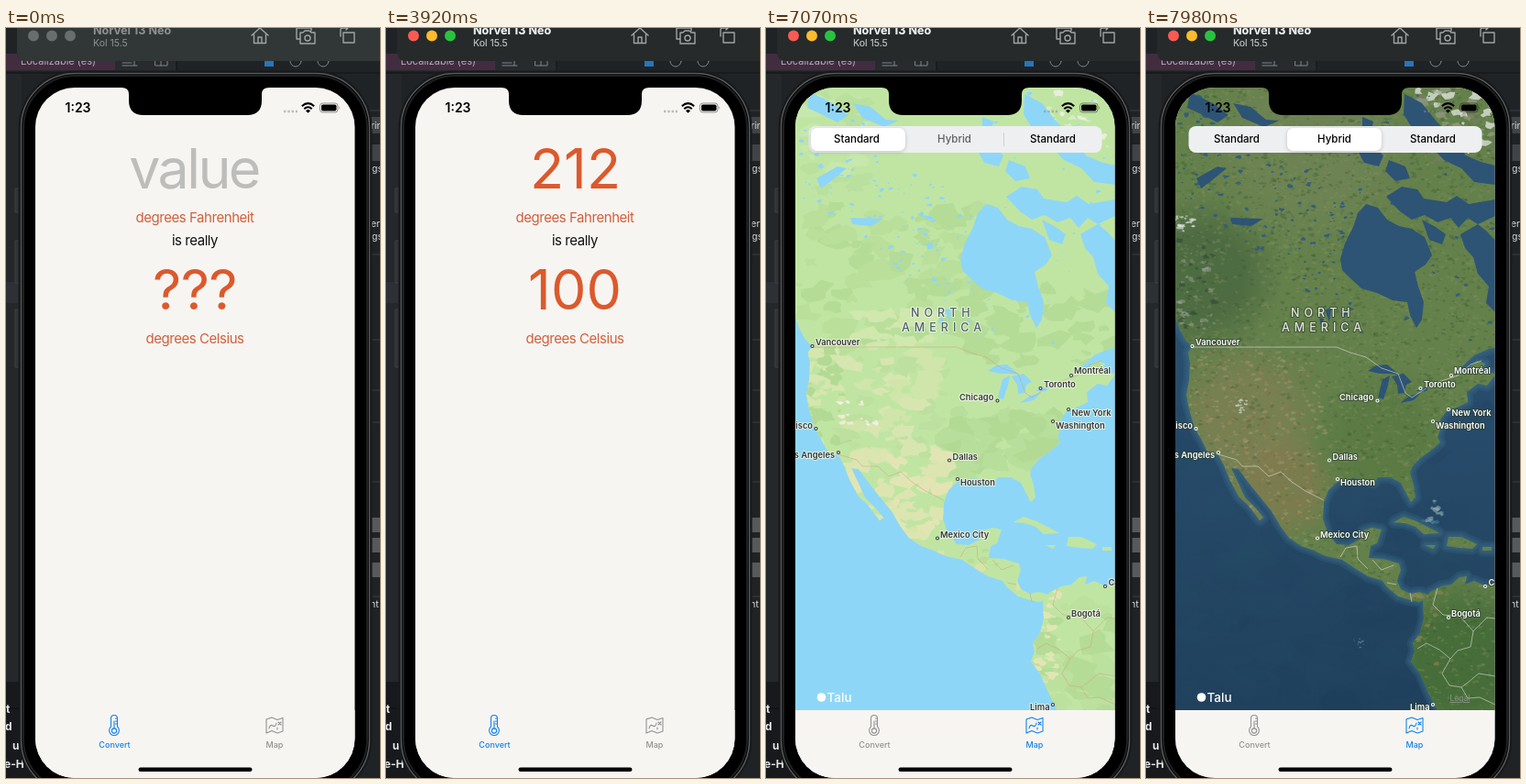
An HTML page with a canvas that plays this animation: 408x818 px, repeating every 8 s.

```html
<!DOCTYPE html>
<html lang="en">
<head>
<meta charset="utf-8">
<title>Converter demo</title>
<style>
html, body { margin: 0; width: 100%; height: 100%; overflow: hidden; background: #1d2022; }
.layer { position: absolute; left: 0; top: 0; width: 408px; height: 818px; display: block; }
.screen { clip-path: inset(65px 27.5px 0 32px round 43px); }
text { font-family: Inter, sans-serif; font-optical-sizing: none; white-space: pre; }
.mid { text-anchor: middle; }
.end { text-anchor: end; }
.big { font-size: 61px; fill: #dc592d; text-anchor: middle; }
.unit { font-size: 15px; letter-spacing: -.45px; text-anchor: middle; }
.tab { font-size: 9px; font-weight: 500; text-anchor: middle; fill: currentColor; }
.seg { font-size: 11.5px; font-weight: 500; text-anchor: middle; }
.line { fill: none; stroke: currentColor; stroke-linejoin: round; stroke-linecap: round; }
.city text { font-size: 9.3px; font-weight: 600; fill: var(--ink); stroke: var(--halo); stroke-width: 2px; paint-order: stroke; stroke-linejoin: round; }
.city circle { fill: var(--dot); stroke: var(--ink); stroke-width: 1.1px; }
.city .region { font-size: 12.5px; font-weight: 500; letter-spacing: 5px; fill: var(--region); }
.day { --ink: #363636; --halo: #f4faeecc; --dot: #fff; --region: #51616b; }
.night { --ink: #fff; --halo: #2a3a2aaa; --dot: #35463a; --region: #e2e6df; }

/* hard cuts */
.cut { animation: 8s step-end infinite; }
.idle { animation-name: idle; }
.live { animation-name: live; }
.caret { animation-name: caret; }
.empty { animation-name: empty; }
.one { animation-name: one; }
.two { animation-name: two; }
.three { animation-name: three; }
.lastCaret { animation-name: lastCaret; }
.map { animation-name: map; }
.dayText { animation-name: dayText; }
.logo { animation-name: logo; }
.legal { animation-name: legal; }
.tabA { animation-name: tabA; }
.tabB { animation-name: tabB; }
@keyframes idle { 0% { opacity: 1 } 11.37%, 100% { opacity: 0 } }
@keyframes live { 0% { opacity: 0 } 11.37%, 100% { opacity: 1 } }
@keyframes caret { 0% { opacity: 0 } 21.87% { opacity: 1 } 26.25% { opacity: 0 } 28.87% { opacity: 1 } 30.62%, 100% { opacity: 0 } }
@keyframes empty { 0% { opacity: 1 } 30.62%, 100% { opacity: 0 } }
@keyframes one { 0% { opacity: 0 } 30.62% { opacity: 1 } 37.62%, 100% { opacity: 0 } }
@keyframes two { 0% { opacity: 0 } 37.62% { opacity: 1 } 41.12%, 100% { opacity: 0 } }
@keyframes three { 0% { opacity: 0 } 41.12%, 100% { opacity: 1 } }
@keyframes lastCaret { 0% { opacity: 1 } 48.99%, 100% { opacity: 0 } }
@keyframes map { 0% { opacity: 0 } 65.62%, 100% { opacity: 1 } }
@keyframes dayText { 0% { opacity: 0 } 69.99% { opacity: 1 } 90.12%, 100% { opacity: 0 } }
@keyframes logo { 0% { color: #3d566b } 87.5%, 100% { color: #fff } }
@keyframes legal { 0% { opacity: 1 } 87.5%, 100% { opacity: 0 } }
@keyframes tabA { 0% { color: #1480ea } 65.62%, 100% { color: #929292 } }
@keyframes tabB { 0% { color: #929292 } 65.62%, 100% { color: #1480ea } }

/* fades and slides */
.sat { animation: sat 8s linear infinite; }
.nightText { animation: nightText 8s linear infinite; }
.thumb { animation: thumb 8s ease-out infinite; }
.press { animation: press 8s linear infinite; }
.divider { animation: divider 8s linear infinite; }
@keyframes sat { 0%, 89% { opacity: 0 } 91.4%, 100% { opacity: 1 } }
@keyframes nightText { 0%, 91% { opacity: 0 } 91.87% { opacity: .33 } 93.6%, 100% { opacity: 1 } }
@keyframes thumb { 0%, 88.3% { transform: none } 88.4% { transform: translateX(1px) } 91.87% { transform: translateX(104.5px) } 94%, 100% { transform: translateX(106px) } }
@keyframes press { 0%, 85.7% { opacity: 1 } 86.6%, 88.5% { opacity: .6 } 90.5%, 100% { opacity: 1 } }
@keyframes divider { 0%, 88.5% { opacity: 1 } 91%, 100% { opacity: 0 } }
</style>
</head>
<body>
<svg class="layer" viewBox="0 0 408 818">
  <rect width="408" height="818" fill="#202326"/>
  <path d="M0 28H186V47H0Z" fill="#282a2e"/>
  <path d="M0 28H119V46H0Z" fill="#422d40"/>
  <path d="M0 49H408M186 28V48" stroke="#111315"/>
  <path d="M0 50H17V715H0Z" fill="#25282b"/>
  <path d="M0 277H17V300H0Z" fill="#2d3035"/>
  <path d="M10 175H20V201H10ZM10 232H20V278H10ZM10 307H20V370H10Z" fill="#303336" stroke="#3c4043"/>
  <path d="M0 715H60V818H0Z" fill="#17191c"/>
  <path d="M0 714H30M0 742H30" stroke="#0b0c0d"/>
  <text x="16" y="40" font-size="11" fill="#b8a9b5">Localizable (es)</text>
  <g class="line" color="#7e8488"><path d="M127 35H143M127 38H137M127 41H143M140 34V41M163 33H176V41H163ZM169 33V41"/><circle cx="316" cy="36" r="6"/><circle cx="346" cy="36" r="6"/></g>
  <path d="M282 33H292V42H282Z" fill="#2476c0"/>
  <g font-size="12" font-weight="700" fill="#e4e6e7">
    <text x="0" y="747">t</text><text x="-1" y="766">d</text><text x="7" y="787">u</text><text x="-2" y="807">e-H</text>
  </g>
  <path d="M396 97H408V115H396ZM396 127H408V145H396Z" fill="#404347"/>
  <path d="M396 534H408V550H396ZM396 556H408V572H396ZM396 583H408V599H396Z" fill="#57595c"/>
  <path d="M396 90H408M396 247H408M396 340H408M396 395H408M396 430H408M396 495H408M396 620H408" stroke="#393d40"/>
  <g font-size="10.5" fill="#d6d8da">
    <text x="398" y="110">rin</text><text x="399" y="157">gs</text><text x="398" y="217">er,</text><text x="399" y="231">gs</text><text x="397" y="632">nt</text>
  </g>
  <rect x="14.5" y="47.5" width="384" height="790" rx="61" fill="#000" stroke="#191b1c" stroke-width="2"/>
  <rect x="16.5" y="49.5" width="380" height="786" rx="59" fill="#000" stroke="#5a5d5e" stroke-width="1.5"/>
  <rect x="19" y="52" width="375" height="781" rx="57" fill="#000" stroke="#1e2021" stroke-width="2"/>

  <path d="M12 0H408V36H22Q12 36 12 26Z" fill="#262a2b"/>
  <g class="cut idle">
    <path d="M12 0H408V36H22Q12 36 12 26Z" fill="#313637"/>
    <g fill="#686d6e"><circle cx="30" cy="8.5" r="6"/><circle cx="50" cy="8.5" r="6"/><circle cx="70" cy="8.5" r="6"/></g>
  </g>
  <g class="cut live"><circle cx="30" cy="8.5" r="6" fill="#fb5a52"/><circle cx="50" cy="8.5" r="6" fill="#fdbb2d"/><circle cx="70" cy="8.5" r="6" fill="#29c23f"/></g>
  <g fill="#8d9192">
    <text x="95" y="7" font-size="12.6" font-weight="700">Norvel 13 Neo</text>
    <text x="95" y="20" font-size="10.5">Kol 15.5</text>
  </g>
  <g class="cut live">
    <text x="95" y="7" font-size="12.6" font-weight="700" fill="#eceded">Norvel 13 Neo</text>
    <text x="95" y="20" font-size="10.5" fill="#b5b8b9">Kol 15.5</text>
  </g>
  <g class="line" color="#9fa4a5" stroke-width="1.4">
    <path d="M268 8L277 0L286 8M270.500 7V16.500H283.500V7M275 16V10H279V16"/>
    <path d="M320 12H317V0H333V3M321 5H324L326 3H331L333 5H337V17H321Z"/><circle cx="329" cy="11" r="3"/>
    <path d="M368 5H380V16H368ZM365 9V2Q365 0 367 0H373M371 -2L373 0L371 2"/>
  </g>
</svg>

<svg class="layer screen" viewBox="0 0 408 818">
  <rect x="32" y="65" width="349" height="753" fill="#f7f5f1"/>
  <g class="cut empty">
    <text class="big" x="205" y="175" style="fill:#bdbdbb;letter-spacing:-2.6px">value</text>
    <text class="big" x="206" y="307" letter-spacing="-.5">???</text>
  </g>
  <rect class="cut caret" x="136.500" y="114" width="2" height="76" fill="#3d8fd8"/>
  <g class="cut one">
    <text class="big" x="206" y="175">2</text><text class="big" x="206" y="307">-16.7</text>
    <rect x="225" y="114" width="2" height="76" fill="#3d8fd8"/>
  </g>
  <g class="cut two">
    <text class="big" x="206" y="175">21</text><text class="big" x="206" y="307">-6.1</text>
    <rect x="238" y="114" width="2" height="76" fill="#3d8fd8"/>
  </g>
  <g class="cut three">
    <text class="big" x="206.500" y="175">212</text><text class="big" x="206" y="307">100</text>
    <rect class="cut lastCaret" x="255" y="114" width="2" height="76" fill="#3d8fd8"/>
  </g>
  <text class="unit" x="206" y="212" fill="#d0603d">degrees Fahrenheit</text>
  <text class="unit" x="206" y="237" fill="#111">is really</text>
  <text class="unit" x="206" y="344" fill="#d0603d">degrees Celsius</text>
</svg>

<div class="layer screen cut map">
  <canvas class="layer" id="day" width="408" height="818"></canvas>
  <canvas class="layer sat" id="sat" width="408" height="818"></canvas>
  <svg class="layer" viewBox="0 0 408 818">
    <defs><g id="cities" class="city">
      <text class="region" x="158" y="315">NORTH</text><text class="region" x="148" y="331">AMERICA</text>
    </g></defs>
    <g class="cut dayText"><use href="#cities" class="day"/></g>
    <g class="nightText"><use href="#cities" class="night"/></g>
    <g class="cut logo"><circle cx="60.500" cy="730" r="4.800" fill="currentColor"/><text x="66.500" y="735" font-size="13.500" font-weight="500" fill="currentColor">Talu</text></g>
    <text class="cut legal" x="331.500" y="734" font-size="8.500" fill="#5c7480" text-decoration="underline">Legal</text>
    <text class="nightText" x="331.500" y="734" font-size="8.500" fill="#8b9689" text-decoration="underline">Legal</text>
    <rect x="46.500" y="107" width="320" height="29" rx="8" fill="#eeeff0"/>
    <path class="divider" d="M259.500 114V129" stroke="#cfd0d2"/>
    <rect class="thumb" x="48" y="109" width="103" height="25" rx="6.500" fill="#fff" style="filter:drop-shadow(0 1px 2px #0003)"/>
    <text class="seg" x="99" y="125">Standard</text><text class="seg press" x="205.500" y="125">Hybrid</text><text class="seg" x="313" y="125">Standard</text>
  </svg>
</div>

<svg class="layer screen" viewBox="0 0 408 818">
  <rect x="32" y="744" width="349" height="74" fill="#f7f5f2"/>
  <g class="cut tabA">
    <g class="line" stroke-width="1.1"><path d="M114.500 762V753A3.500 3.500 0 0 1 121.500 753V762A5.400 5.400 0 1 1 114.500 762ZM118 756V764M119.500 753H121M119.500 756H121M119.500 759H121"/><circle cx="118" cy="766.500" r="2.600"/></g>
    <text class="tab" x="118.500" y="784.500">Convert</text>
  </g>
  <g class="cut tabB">
    <path class="line" stroke-width="1.100" d="M284 754L290 752L296 754.500L302 752.500V767L296 769L290 766.500L284 769ZM287 764Q288 759 291 761T295 758M297 757L300 760M300 757L297 760M296 763V765"/>
    <text class="tab" x="293" y="784.500">Map</text>
  </g>
  <rect x="144.500" y="806.500" width="124" height="4.500" rx="2.250"/>
  <path d="M126 64H287V65Q279 65 279 72V79Q279 95 263 95H150Q134 95 134 79V72Q134 65 126 65Z"/>
  <text x="64.500" y="92" font-size="14" font-weight="600">1:23</text>
  <path d="M303 91H318" stroke="#8888" stroke-width="2.400" stroke-dasharray="2.400 1.900"/>
  <g fill="none" stroke="#000" stroke-width="2"><path d="M322.800 85.300Q329.500 79 336.200 85.300M325.300 88.200Q329.500 84.300 333.700 88.200"/></g>
  <path d="M327 90.200Q329.500 88 332 90.200L329.500 92.700Z"/>
  <rect x="342.500" y="82" width="19.500" height="10" rx="3" fill="none" stroke="#0006"/>
  <rect x="344" y="83.500" width="16.500" height="7" rx="1.800"/><path d="M363.500 85.500Q365 87 363.500 88.500Z" fill="#0008"/>
</svg>

<script>
const cities = [
  ['Vancouver', 54, 346, 50.5, 347], ['Montréal', 336, 377, 333, 379], ['Toronto', 303, 392, 299.5, 393],
  ['Chicago', 211, 406, 252.5, 406.5], ['New York', 333.5, 423, 330, 416], ['Washington', 316, 436.5, 313, 429],
  ['San Francisco', 51, 437, 54.5, 437, 'end'], ['Los Angeles', 75, 469, 79, 463, 'end'],
  ['Dallas', 203.5, 471, 200, 471.5], ['Houston', 212, 499, 209, 492], ['Mexico City', 190, 556, 187, 556.5],
  ['Bogotá', 333, 642, 330, 643], ['Caracas', 373.5, 608, 370, 609], ['Lima', 309.5, 744, 313, 738, 'end']
];
function svg(tag, attrs, text = '') {
  const el = document.createElementNS('http://www.w3.org/2000/svg', tag);
  for (const k in attrs) el.setAttribute(k, attrs[k]);
  el.textContent = text;
  document.getElementById('cities').append(el);
}
for (const [name, x, y, cx, cy, side = ''] of cities) {
  svg('circle', { cx, cy, r: 1.5 });
  svg('text', { x, y, class: side }, name);
}

const west = 'M32 60H390V347L374 350 358 357 345 369 336 378 350 372 361 363 370 366 366 375 382 377 372 390 362 388 350 397 351 408 341 413 328 418 321 427 322 436 318 446 321 452 309 462 298 470 290 479 288 486 292 499 294 512 289 517 283 506 278 496 267 490 253 490 249 496 240 493 226 491 209 495 199 504 194 518 ';
const land = new Path2D(west +
  '193 535 198 551 208 563 221 564 233 558 237 548 247 545 257 547 252 562 245 565 243 578 259 579 276 584 278 591 274 603 278 612 288 617 298 615 308 618 304 624 298 626 288 624 275 620 263 610 258 603 242 598 229 590 214 580 196 576 183 570 169 565 156 556 147 544 137 527 124 511 112 496 101 481 93 480 ' +
  '100 495 108 512 120 524 128 534 124 537 111 520 101 511 91 492 85 477 79 466 67 462 60 448 53 436 47 416 44 400 47 384 48 366 46 354 50 347 43 340 36 327 32 316Z');
land.addPath(new Path2D('M302 625L310 615 322 609 333 607 342 599 350 598 348 607 358 603 369 608 390 605V750H321L309 727 299 704 289 691 293 680 291 671 299 660 303 644Z'));
land.addPath(new Path2D('M270 539L281 533 295 538 309 545 320 551 303 552 294 544 282 540ZM330 555L344 555 361 563 356 568 343 567 328 565ZM305 564L316 564 313 568ZM367 566H377V570H367Z'));

const bay = new Path2D('M212 252L217 235 226 217 231 202 240 192 253 196 263 209 276 216 290 219 304 228 312 248 305 258 293 266 297 282 303 299 301 318 295 327 288 313 285 299 269 297 252 289 235 284 223 273 214 264Z' +
  'M262 184L279 173 296 176 303 186 328 190 339 183 352 192 381 187V205L362 214 351 207 341 218 332 207 318 212 304 204 290 209 277 200ZM301 209L316 217 327 225 323 236 309 231Z' +
  'M362 214L372 222 381 232V310L371 300 374 282 362 268 357 250 348 240 343 225Z');
bay.addPath(new Path2D('M282 72L301 82 317 102 335 120 349 139 365 146 381 150V171L358 168 344 153 325 144 308 126 292 112 281 94ZM236 97L248 102 244 119 236 113ZM226 125L246 126 259 139 254 151 238 147ZM265 144L283 151 288 164 272 167 261 156Z' +
  'M48 70L73 82 90 95 78 103 60 94 45 87ZM95 82L114 86 131 100 145 101 129 108 105 98ZM55 164L78 151 88 153 71 167 60 175ZM92 207L128 208 115 216 94 214ZM195 307L202 306 200 321ZM189 316L194 317 192 329Z'));
bay.addPath(new Path2D('M242 374L251 368 263 367 276 378 265 377 255 377ZM258 383L266 379 264 390 259 405 253 403ZM268 380L281 377 290 386 284 389 282 398 275 399 274 389ZM277 409L288 401 300 398 292 406ZM294 396L309 390 306 396Z'));
const borders = new Path2D('M50 348H208L223 354 240 359 257 371 275 377 283 398 290 403 304 394 316 387 340 379 354 367 366 363M79 465L99 471 105 478 122 478 134 489 147 484 159 495 174 505 194 515M212 577L218 567 230 565 231 579 242 590M247 580L257 591 270 586M263 605L273 607M288 616L290 626');
const south = new Path2D('M318 611L313 629 324 640 343 642 357 658 354 675 340 679 332 688 320 678 306 671 296 677M357 658L372 643 381 644M332 688L323 704 331 717 344 719 351 731 364 730 381 738M381 707L363 704 351 714 344 719');

let seed = 7;
const rnd = (a = 0, b = 1) => a + (b - a) * ((seed = seed * 16807 % 2147483647) / 2147483647);
function blob(c, x, y, r, color) {
  c.fillStyle = color;
  c.beginPath();
  for (let i = 0; i < 9; i++) {
    const a = i * Math.PI / 4.5, q = r * rnd(.4, 1.3);
    c.lineTo(x + Math.cos(a) * q * 1.3, y + Math.sin(a) * q * .8);
  }
  c.fill();
}
function scatter(c, n, [x1, y1, x2, y2], r, colors) {
  for (let i = 0; i < n; i++) blob(c, rnd(x1, x2), rnd(y1, y2), rnd(r / 4, r), colors[i % colors.length]);
}
function glow(c, x, y, r, color) {
  const g = c.createRadialGradient(x, y, 0, x, y, r);
  g.addColorStop(0, color);
  g.addColorStop(.5, color);
  g.addColorStop(1, color.slice(0, 7) + '00');
  c.fillStyle = g;
  c.fillRect(x - r, y - r, 2 * r, 2 * r);
}
function lakes(c, color) {
  for (let i = 0; i < 150; i++) {
    const x = rnd(34, 225);
    blob(c, x, 90 + x * .75 + rnd(-65, 65), rnd(.5, 3), color);
  }
  scatter(c, 60, [215, 70, 380, 345], 2.5, [color]);
}
function outlines(c, color) {
  c.strokeStyle = color;
  c.lineWidth = .9;
  c.stroke(borders);
  c.stroke(south);
}

function drawDay(c) {
  const sea = '#8ed6f7';
  c.fillStyle = sea;
  c.fillRect(0, 0, 408, 818);
  c.save();
  c.clip(land);
  c.fillStyle = '#c0e5a3';
  c.fillRect(0, 0, 408, 818);
  scatter(c, 80, [32, 190, 240, 350], 18, ['#b4dc96', '#b9df9b']);
  scatter(c, 35, [220, 280, 390, 370], 16, ['#b4dc96']);
  scatter(c, 30, [32, 65, 110, 180], 15, ['#c7e8ad', '#b9e09d']);
  scatter(c, 60, [205, 418, 320, 488], 18, ['#b2da94', '#b8de9b']);
  scatter(c, 40, [40, 350, 85, 455], 9, ['#b2da94', '#d5e6ae']);
  scatter(c, 65, [80, 360, 195, 470], 14, ['#d7e6b0', '#cfe5aa', '#bddf9f']);
  scatter(c, 25, [98, 308, 190, 347], 11, ['#d0e7ad']);
  scatter(c, 55, [85, 465, 195, 560], 13, ['#e2e5b3', '#dce5b0']);
  scatter(c, 25, [160, 545, 285, 620], 7, ['#d8e3aa', '#badc98']);
  scatter(c, 35, [300, 625, 385, 750], 18, ['#b4dc96', '#bce09e']);
  scatter(c, 30, [290, 600, 320, 744], 6, ['#e2e5b3']);
  scatter(c, 14, [80, 400, 120, 440], 4, ['#f0ead0', '#f3f1e6']);
  scatter(c, 22, [300, 70, 380, 140], 5, ['#e9eedb', '#d7ebc2']);
  lakes(c, sea);
  c.restore();
  c.fillStyle = sea;
  c.fill(bay);
  outlines(c, '#d59f8399');
}

function drawSat(c) {
  const sea = c.createLinearGradient(0, 340, 0, 744);
  sea.addColorStop(0, '#294e6e');
  sea.addColorStop(1, '#20415d');
  c.fillStyle = sea;
  c.fillRect(0, 0, 408, 818);
  scatter(c, 120, [32, 400, 380, 744], 30, ['#2d52700c', '#18385510']);
  c.lineJoin = 'round';
  for (const w of [13, 8, 4]) {
    c.lineWidth = w;
    c.strokeStyle = '#40748c38';
    c.stroke(land);
  }
  scatter(c, 14, [302, 515, 325, 540], 4, ['#5b98a855', '#a2c0bc88']);
  c.save();
  c.clip(land);
  c.fillStyle = '#64804b';
  c.fillRect(0, 0, 408, 818);
  glow(c, 110, 425, 85, '#85805799');
  glow(c, 150, 500, 60, '#887a5099');
  glow(c, 260, 450, 85, '#56773f99');
  glow(c, 345, 690, 95, '#3f6935cc');
  glow(c, 60, 270, 90, '#46643fbb');
  glow(c, 180, 130, 120, '#74855988');
  for (let i = 0; i < 8500; i++) {
    const x = rnd(32, 381), y = rnd(65, 744);
    const dry = x < 195 && y > 350 && y < 560;
    const tones = dry ? ['#a0895f66', '#5b693d88', '#8b6e4866', '#b8a58055'] : ['#3d5e3466', '#7d945955', '#4d703d66', '#93936a44'];
    blob(c, x, y, rnd(.6, 2.6), tones[i % 4]);
  }
  scatter(c, 60, [34, 230, 75, 350], 4, ['#334f38aa', '#a5aea566']);
  scatter(c, 70, [295, 65, 381, 145], 7, ['#e6e9e4bb', '#9ea28f99', '#777e62aa']);
  scatter(c, 18, [32, 205, 52, 222], 3, ['#dfe5e2aa']);
  scatter(c, 10, [100, 406, 110, 420], 3, ['#d2d9d2bb']);
  scatter(c, 40, [290, 605, 320, 744], 4, ['#9a885b88', '#56703f99']);
  lakes(c, '#345f7a');
  c.restore();
  c.fillStyle = '#2d5475';
  c.fill(bay);
  scatter(c, 12, [226, 666, 240, 676], 1.5, ['#7796a288']);
  outlines(c, '#dfe0d4aa');
}

drawDay(document.getElementById('day').getContext('2d'));
drawSat(document.getElementById('sat').getContext('2d'));
</script>
</body>
</html>
```
